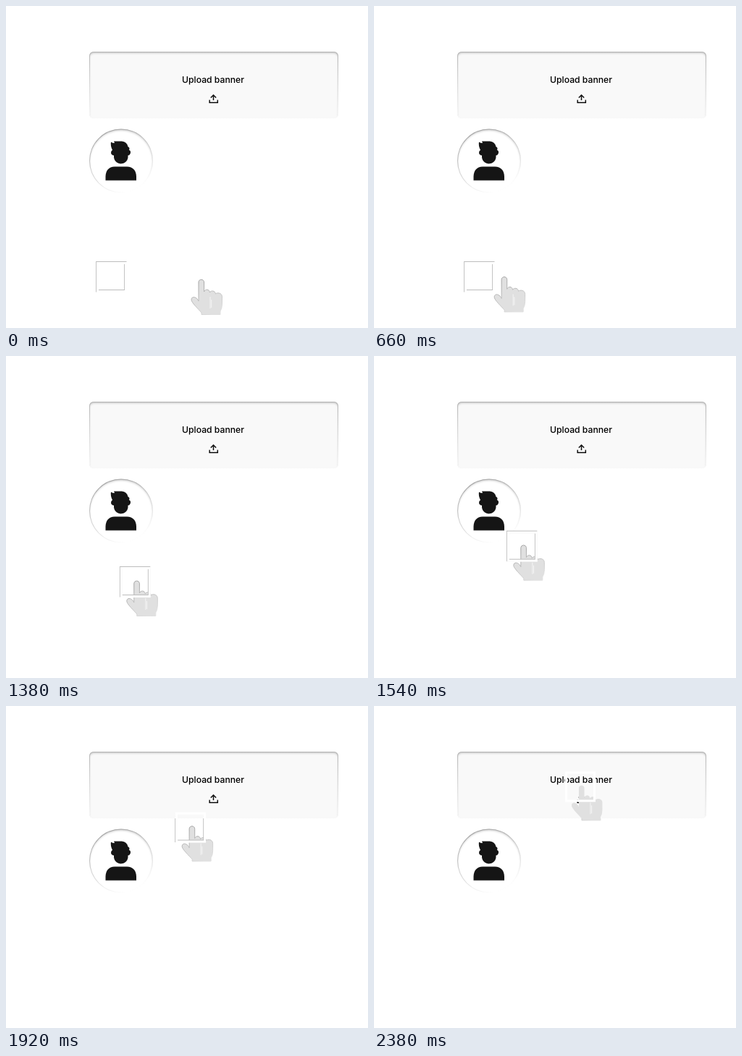
Recreate the animation shown at these times as an HTML page with a canvas. Size 500 px wide and 444 px high, loop 2400 ms.

```html
<!DOCTYPE html>
<html lang="en">
<head>
<meta charset="utf-8">
<title>Upload banner</title>
<style>
  html, body { margin: 0; width: 100%; height: 100%; overflow: hidden; background: #fff; }
  canvas { display: block; width: 500px; height: 444px; }
</style>
</head>
<body>
<canvas id="stage" width="500" height="444"></canvas>
<script>
const ctx = document.getElementById('stage').getContext('2d');
const LOOP = 2400, HALF = LOOP / 2;
const INK = '#151515';

const banner = new Path2D();
banner.roundRect(115, 63, 344, 92, 6);

const avatar = new Path2D();
avatar.arc(159, 213.5, 44, 0, Math.PI * 2);

const person = new Path2D(
  'M145 187.5Q147 189 150 189L149 186.5H160Q167 187 168.5 194Q171.5 195 170 198.5' +
  'Q172.5 199.5 172 202.5Q171 206 168.5 206V208.5C168 214.5 163 217.5 158.5 217.5' +
  'S149.5 214 149 208.5V206Q146 206 145 203Q144.6 200 147 198.5Q144 193 145 187.5Z' +
  'M137.5 240.5V235Q138 222 150 221.5H167Q179.5 222 180 235V240.5Z');

const hand = new Path2D(
  'M10 30V4C10 -1 17.6 -1 17.6 4V17C19 13 25 13 25.4 18C27 15 33 15 33.4 20' +
  'C35 18 42.5 18 42.5 24V34Q42.5 40 40 44V48.5H14V46C10 41 0 32 0 28C0 23 7 23 10 30Z');
const creases = new Path2D('M26 24V40M27.7 28V39');

const tile = new Path2D();
tile.rect(1.5, 7.5, 39, 39);

// Everything on the stage outside a shape; use with the evenodd rule.
function outsideOf(shape) {
  const path = new Path2D();
  path.rect(0, 0, 500, 444);
  path.addPath(shape);
  return path;
}
const outsideBanner = outsideOf(banner);

// Cubic bezier ease-out (0, 0, .58, 1)
function easeOut(x) {
  let lo = 0, hi = 1;
  for (let i = 0; i < 24; i++) {
    const s = (lo + hi) / 2;
    if (1.74 * s * s * (1 - s) + s ** 3 < x) lo = s; else hi = s;
  }
  return 3 * lo * lo - 2 * lo ** 3;
}

function fade(x0, y0, x1, y1, ...colors) {
  const g = ctx.createLinearGradient(x0, y0, x1, y1);
  colors.forEach((c, i) => g.addColorStop(i / (colors.length - 1), c));
  return g;
}

function stroke(path, style, width) {
  ctx.strokeStyle = style;
  ctx.lineWidth = width;
  ctx.stroke(path);
}

function insetPanel(shape, fill, edge) {
  ctx.save();
  ctx.fillStyle = fill;
  ctx.fill(shape);
  ctx.clip(shape);
  ctx.save();
  ctx.shadowColor = 'rgba(0,0,0,.22)';
  ctx.shadowBlur = 3;
  ctx.shadowOffsetY = 2;
  ctx.fillStyle = '#fff';
  ctx.fill(outsideOf(shape), 'evenodd');
  ctx.restore();
  stroke(shape, edge, 2);
  ctx.restore();
}

function drawPanels() {
  insetPanel(banner, '#f9f9f9', fade(0, 63, 0, 155, '#b4b4b4', '#d8d8d8', '#f9f9f9'));
  insetPanel(avatar, '#fff', fade(140, 170, 178, 250, '#a0a0a0', '#d0d0d0', '#fff'));
  ctx.fillStyle = INK;
  ctx.fill(person);

  ctx.fillStyle = '#000';
  ctx.font = '500 12.2px Inter, sans-serif';
  ctx.textAlign = 'center';
  ctx.fillText('Upload banner', 286, 105.5);
  const icon = new Path2D('M286.5 130V123.2M282.8 126.5L286.5 122.8L290.2 126.5M281.2 129.5V133.3H292.3V129.5');
  stroke(icon, '#111', 1.5);
}

// Grey rims show only on the white page, not over the banner.
function rim(path, x, y, style, width) {
  ctx.save();
  ctx.clip(outsideBanner, 'evenodd');
  ctx.translate(x, y);
  stroke(path, style, width);
  ctx.restore();
}

function drawHand(x, y) {
  ctx.save();
  ctx.translate(x, y);
  ctx.fillStyle = '#e0e0e0';
  ctx.fill(hand);
  stroke(creases, '#f4f4f4', 1);
  ctx.restore();
  rim(hand, x, y, fade(8, 0, 34, 46, '#a0a0a0', '#bcbcbc', '#e0e0e0'), 1);
}

function drawTile(x, y) {
  rim(tile, x - 0.7, y - 0.7, '#bdbdbd', 3.4);
  ctx.save();
  ctx.translate(x, y);
  stroke(tile, '#fff', 3);
  ctx.restore();
}

function draw(time) {
  const t = time % LOOP;
  const reach = easeOut(Math.min(t / HALF, 1));
  const drag = t > HALF ? easeOut((t - HALF) / HALF) : 0;
  const dx = 139 * drag, dy = -263 * drag;

  ctx.fillStyle = '#fff';
  ctx.fillRect(0, 0, 500, 444);
  drawPanels();
  drawHand(256 - 122 * reach + dx, 377 - 5 * reach + dy);
  drawTile(125 + dx, 347 + dy);
}

let start;
function tick(now) {
  start ??= now;
  draw(Math.max(0, now - start));
  requestAnimationFrame(tick);
}
draw(0);
requestAnimationFrame(tick);
</script>
</body>
</html>
```
